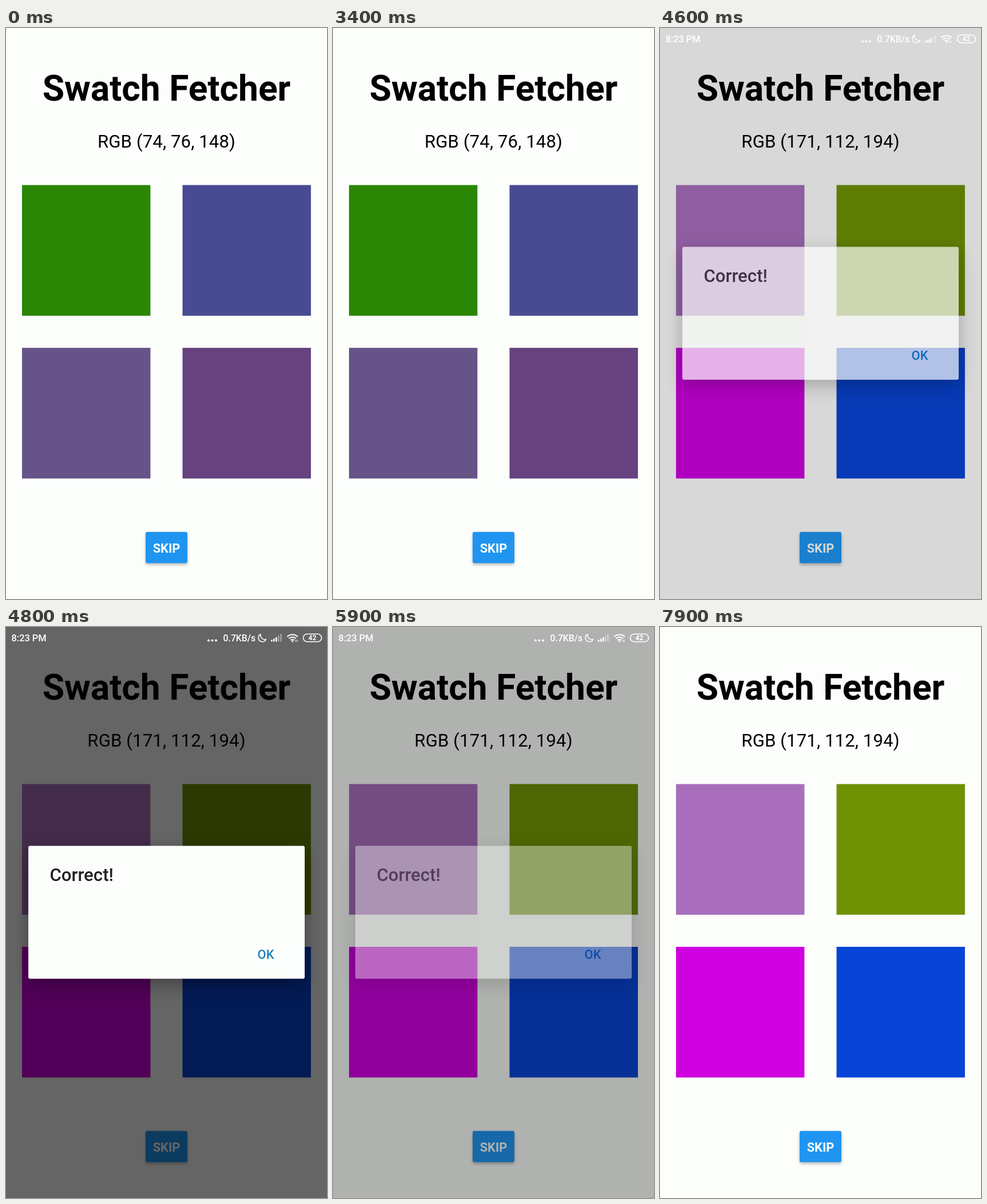
An HTML page that plays this animation: 561x998 px, repeating every 8000 ms.

```html
<!DOCTYPE html>
<html lang="en">
<head>
<meta charset="utf-8">
<title>Swatch Fetcher</title>
<style>
  html, body { margin: 0; width: 100%; height: 100%; overflow: hidden; background: #fcfefc; }
  svg { display: block; width: 100vw; height: 100vh; font-family: Roboto, sans-serif; }
  .mid { text-anchor: middle; }
  .title { font-size: 62.33px; font-weight: 700; }
  .code { font-size: 31.17px; letter-spacing: .1px; }
  .label { font-size: 21.8px; font-weight: 500; }
  .skip { font-weight: 700; fill: #fcfefc; }
  .button { fill: #1f95f1; filter: drop-shadow(0 3px 2.5px rgba(0, 0, 0, .28)); }
  .panel { fill: #fcfefc; filter: drop-shadow(0 0 13px rgba(0, 0, 0, .1)) drop-shadow(0 14px 15px rgba(0, 0, 0, .26)); }
  .heading { font-size: 31.17px; font-weight: 500; fill: #212121; }
  .ok { fill: #1b7fbd; }
  .status { fill: #fff; font-weight: 500; }
  .line { fill: none; stroke: #fff; }

  /* One 8 s loop, in hard 100 ms steps */
  .first, .second, .dim, .dialog, .status, .touch { animation: 8s step-end infinite; }
  .first { animation-name: first; }
  .second { animation-name: second; }
  .dim { animation-name: dim; }
  .dialog { animation-name: dialog; }
  .status { animation-name: status; }
  .touch { animation-name: touch; }
  @keyframes first { 0% { opacity: 1; } 57.5%, 100% { opacity: 0; } }
  @keyframes second { 0% { opacity: 0; } 57.5%, 100% { opacity: 1; } }
  @keyframes dim {
    0% { opacity: 0; } 57.5% { opacity: .15; } 58.75% { opacity: .5; }
    60% { opacity: .6; } 73.75% { opacity: .3; } 75%, 100% { opacity: 0; }
  }
  @keyframes dialog {
    0% { opacity: 0; } 57.5% { opacity: .7; } 58.75% { opacity: 1; }
    73.75% { opacity: .4; } 75%, 100% { opacity: 0; }
  }
  @keyframes status { 0% { opacity: 0; } 57.5% { opacity: 1; } 75%, 100% { opacity: 0; } }
  @keyframes touch { 0% { opacity: 0; } 71.25% { opacity: 1; } 73.75%, 100% { opacity: 0; } }
</style>
</head>
<body>
<svg viewBox="0 0 561 998" preserveAspectRatio="none">
  <defs>
    <rect id="tl" x="28" y="274.5" width="224.4" height="228.4"/>
    <rect id="tr" x="308.5" y="274.5" width="224.4" height="228.4"/>
    <rect id="bl" x="28" y="559" width="224.4" height="228.4"/>
    <rect id="br" x="308.5" y="559" width="224.4" height="228.4"/>
  </defs>
  <rect width="561" height="998" fill="#fcfefc"/>

  <text class="title mid" x="280.5" y="127">Swatch Fetcher</text>
  <g class="first">
    <text class="code mid" x="280.5" y="209">RGB (74, 76, 148)</text>
    <use href="#tl" fill="#2b8705"/>
    <use href="#tr" fill="#484b91"/>
    <use href="#bl" fill="#665488"/>
    <use href="#br" fill="#66427e"/>
  </g>
  <g class="second">
    <text class="code mid" x="280.5" y="209">RGB (171, 112, 194)</text>
    <use href="#tl" fill="#a86ebc"/>
    <use href="#tr" fill="#6f9205"/>
    <use href="#bl" fill="#cf00e0"/>
    <use href="#br" fill="#0844d6"/>
  </g>
  <rect class="button" x="244" y="880.7" width="73" height="54.6" rx="3"/>
  <text class="label skip mid" x="280.5" y="916.5">SKIP</text>

  <rect class="dim" width="561" height="998"/>

  <g class="status">
    <text x="9.5" y="25" font-size="16.4">8:23 PM</text>
    <circle cx="354" cy="23.5" r="2"/>
    <circle cx="360.5" cy="23.5" r="2"/>
    <circle cx="367" cy="23.5" r="2"/>
    <text x="379.5" y="25" font-size="15.8">0.7KB/s</text>
    <path class="line" stroke-width="1.5" stroke-linejoin="round" d="M445 12.5A7 7 0 1 0 454.5 21.5A7.5 7.5 0 0 1 445 12.5Z"/>
    <path class="line" stroke-width="2.6" d="M464.3 25.5v-3M468.3 25.5v-5M472.3 25.5v-7.5"/>
    <path class="line" stroke-width="2.6" opacity=".4" d="M476.3 25.5v-10.5M480.5 25.5v-13.5"/>
    <path class="line" stroke-width="2" d="M491.5 17a13 13 0 0 1 18.5 0M494.5 20.3a9 9 0 0 1 12.5 0M497.5 23.2a5 5 0 0 1 6.5 0"/>
    <circle cx="500.7" cy="25" r="1.5"/>
    <path class="line" stroke-width="1" d="M506.5 22.5v3.5M509 22.5v3.5"/>
    <rect class="line" stroke-width="1.6" x="519.5" y="12.3" width="32" height="13.4" rx="6.7"/>
    <text class="mid" x="535.5" y="23.3" font-size="12" font-weight="700">42</text>
  </g>

  <g class="dialog">
    <rect class="panel" x="39" y="382.5" width="483" height="232.3" rx="3"/>
    <text class="heading" x="76.4" y="444">Correct!</text>
    <text class="label ok mid" x="454" y="580">OK</text>
  </g>
  <circle class="touch" cx="453" cy="586" r="17" fill="#fcfefc" fill-opacity=".7" stroke="#cfcfe8" stroke-width="2.5"/>
</svg>
</body>
</html>
```
